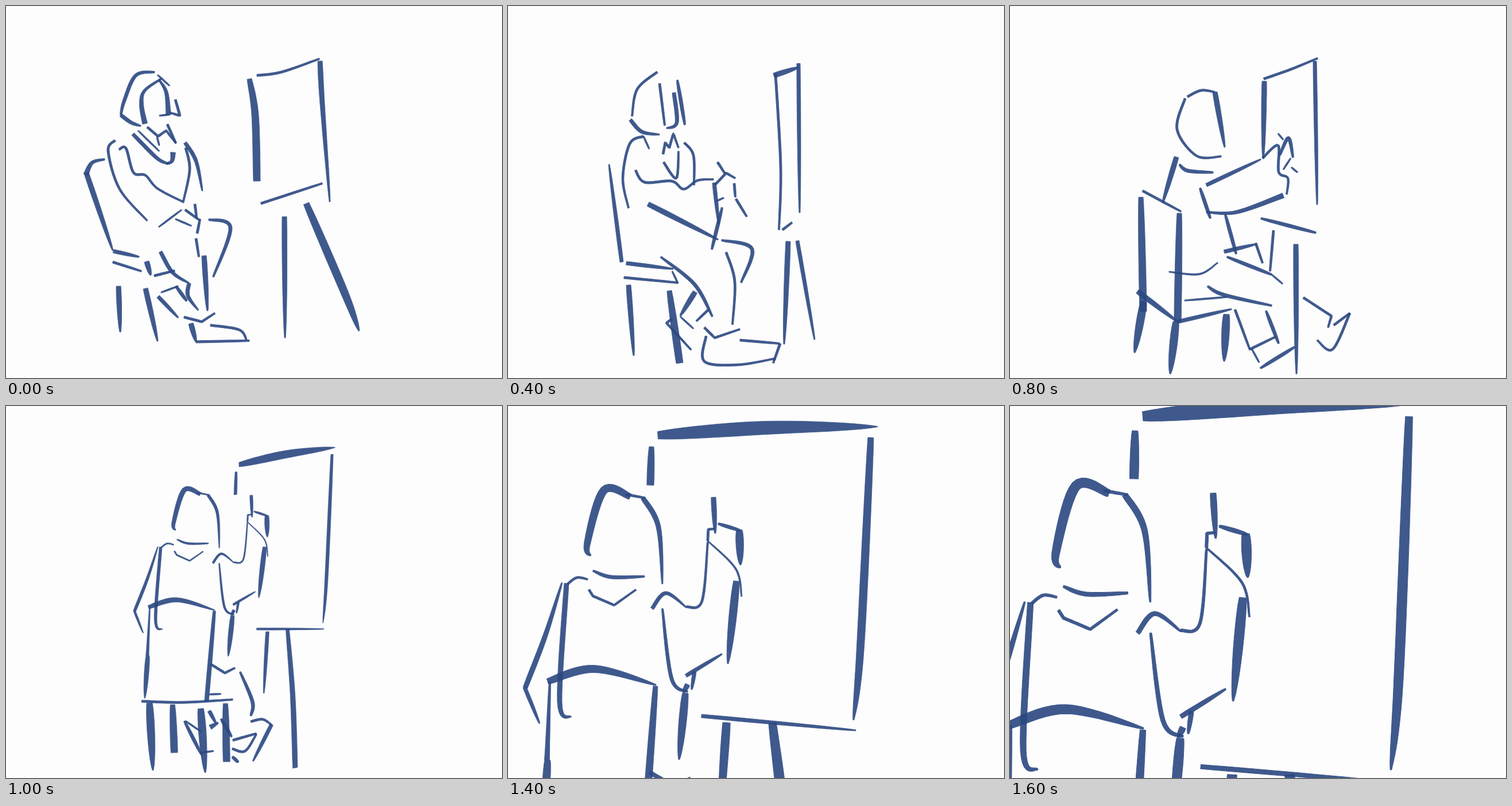
An HTML page for the animation above (2200 ms loop, 864x648 px).

```html
<!DOCTYPE html>
<html lang="en">
<head>
<meta charset="utf-8">
<title>Sketching at the easel</title>
<style>
html, body { margin: 0; width: 100%; height: 100%; overflow: hidden; background: #fdfdfd; }
svg { display: block; width: 100vw; height: 100vh; }
path { fill: #2b4881; stroke: #2b4881; stroke-width: .8; stroke-linejoin: round; opacity: .9; }
</style>
</head>
<body>
<svg id="stage" viewBox="0 0 864 648"></svg>
<script>
const NS = 'http://www.w3.org/2000/svg';
const LOOP = 2200, STEP = 200;
const stage = document.getElementById('stage');
let ink = stage;

function add(parent, tag, attributes) {
  const node = parent.appendChild(document.createElementNS(NS, tag));
  for (const name in attributes) node.setAttribute(name, attributes[name]);
  return node;
}

const widthAt = ([a, b, c], u) =>
  Math.max(.5, a * (1 - u) * (1 - 2 * u) + 4 * b * u * (1 - u) + c * u * (2 * u - 1));

const curve = (a, b, c, d, t) =>
  b + t / 2 * (c - a + t * (2 * a - 5 * b + 4 * c - d + t * (3 * (b - c) + d - a)));
const straight = (a, b, c, d, t) => b + (c - b) * t;

function spine(flat, blend) {
  const last = flat.length / 2 - 1, steps = 10, out = [];
  const at = (i, n) => flat[2 * Math.min(last, Math.max(0, i)) + n];
  for (let k = 0; k <= last * steps; k++) {
    const i = Math.min(last - 1, Math.floor(k / steps)), t = k / steps - i;
    out.push([0, 1].map(n => blend(at(i - 1, n), at(i, n), at(i + 1, n), at(i + 2, n), t)));
  }
  return out;
}

// Outline of a ribbon whose width runs from start over middle to end.
function ribbon(widths, flat, blend) {
  const mid = spine(flat, blend), end = mid.length - 1, left = [], right = [];
  mid.forEach(([x, y], i) => {
    const [ax, ay] = mid[Math.max(0, i - 1)], [bx, by] = mid[Math.min(end, i + 1)];
    const half = widthAt(widths, i / end) / 2 / (Math.hypot(bx - ax, by - ay) || 1);
    const dx = (ay - by) * half, dy = (bx - ax) * half;
    left.push([x + dx, y + dy]);
    right.unshift([x - dx, y - dy]);
  });
  return 'M' + [...left, ...right].map(p => p.map(v => v.toFixed(1)).join(' ')).join('L') + 'Z';
}

const nib = (widths, blend = curve) => (...flat) =>
  add(ink, 'path', { d: ribbon(widths, flat, blend) });

const fine = nib([2, 3, 2]);
const line = nib([4, 4, 3]);
const zig = nib([4, 4, 3], straight);
const swell = nib([3, 6, 3]);
const taper = nib([6, 6, 2]);
const grow = nib([3, 6, 9]);
const brush = nib([8, 8, 2]);
const broad = nib([10, 13, 2]);
const slab = nib([8, 12, 12]);
const beam = nib([13, 23, 1]);

function frontSitter() {
  swell(259,115, 226,121, 206,165, 200,190);
  taper(200,190, 218,203, 235,209);
  fine(264,120, 285,139);
  grow(270,127, 241,148, 236,172, 242,205);
  grow(266,128, 279,150, 283,189);
  fine(267,191, 286,189);
  zig(295,163, 303,191, 286,186);
  zig(246,211, 265,227, 279,217, 296,239);
  fine(263,228, 267,243);
  line(281,206, 296,239);
  taper(221,223, 263,265, 284,275);
  fine(230,217, 267,253);
  grow(279,275, 289,270, 291,255);
  line(190,234, 178,253, 198,319, 246,374);
  line(197,250, 209,248, 222,290, 243,295, 264,318, 310,342);
  line(313,247, 320,285, 309,340);
  taper(312,238, 331,270, 342,322);
  fine(266,385, 306,355);
  line(312,355, 337,373);
  line(329,345, 332,369);
  line(333,396, 338,371);
  fine(295,371, 323,383);
  swell(353,372, 391,386, 361,472);
  line(331,405, 336,437);
  brush(345,435, 351,531);
  taper(269,428, 290,464, 319,483);
  taper(319,483, 317,505, 335,530);
  fine(270,499, 300,488);
  swell(296,488, 315,514);
  taper(265,506, 300,543);
  zig(310,542, 341,550, 364,535);
  brush(322,553, 331,585);
  line(331,585, 424,583);
  line(356,556, 406,564, 419,582);
}

function frontChair() {
  grow(172,267, 150,273, 139,294);
  brush(140,291, 186,426);
  taper(187,427, 232,437);
  line(186,446, 236,462);
  brush(245,445, 252,469);
  line(258,470, 294,461);
  brush(196,488, 199,568);
  brush(243,492, 264,584);
}

function frontEasel() {
  line(437,121, 480,115, 546,92);
  brush(547,96, 551,170, 564,341);
  slab(424,127, 434,190, 437,305);
  line(444,344, 551,309);
  brush(485,367, 486,578);
  broad(523,344, 590,500, 615,566);
}

function sideSitter() {
  line(260,115, 225,145, 216,192);
  taper(213,198, 233,219, 264,224);
  line(264,135, 273,208);
  taper(289,151, 294,203, 276,213);
  swell(295,129, 308,207);
  zig(270,258, 274,238, 281,247, 288,222, 297,247);
  fine(236,227, 246,249);
  line(236,227, 212,240, 200,300, 210,352);
  line(307,238, 323,260, 324,312);
  line(271,272, 293,300, 297,253);
  line(222,286, 238,307, 285,305, 306,319, 330,304, 358,302);
  brush(244,345, 366,407);
  taper(359,308, 367,380);
  swell(373,351, 355,424);
  line(365,272, 378,292);
  zig(361,311, 380,291, 396,300);
  line(394,309, 396,333);
  fine(363,340, 376,334);
  line(397,336, 416,367);
  swell(372,408, 425,423, 406,482);
  line(380,429, 395,480, 391,555);
  swell(266,437, 325,485, 356,541);
  brush(326,498, 300,540);
  fine(300,541, 323,562);
  line(349,529, 328,549);
  zig(286,545, 276,552, 319,599);
  zig(342,560, 360,578, 404,563);
  line(345,575, 342,619, 400,625, 466,614);
  line(404,582, 473,588);
  line(474,588, 462,622);
}

function sideChair() {
  taper(198,446, 176,276);
  taper(206,448, 288,458);
  line(202,473, 296,482);
  fine(286,462, 296,483);
  brush(210,486, 219,609);
  slab(281,496, 299,622);
}

function sideEasel() {
  line(466,119, 475,280, 472,390);
  brush(463,121, 506,107);
  taper(506,100, 508,360);
  line(478,390, 495,377);
  brush(488,410, 481,589);
  taper(504,409, 534,581);
}

function awaySitter() {
  line(305,161, 291,215, 325,261, 368,262);
  line(309,158, 333,147, 357,150);
  brush(357,150, 374,246);
  swell(295,276, 310,287, 354,290);
  brush(290,263, 266,343);
  swell(331,317, 349,370);
  taper(342,312, 437,267);
  grow(342,359, 395,359, 476,330);
  line(440,265, 467,243, 468,289, 484,300, 482,328);
  fine(467,222, 476,233);
  swell(470,260, 485,230, 493,264);
  fine(489,265, 476,285);
  fine(490,281, 501,290);
  swell(375,363, 394,432);
  taper(373,428, 428,415);
  line(428,413, 440,448);
  swell(378,437, 456,468);
  fine(456,468, 475,484);
  swell(344,488, 372,503, 456,522);
  fine(277,463, 330,467, 362,447);
  fine(304,513, 378,507);
  line(392,529, 418,599);
  swell(446,531, 468,588);
  line(418,598, 463,576);
  fine(421,597, 434,621);
  swell(436,631, 496,594);
  zig(511,508, 560,540, 554,560);
  zig(564,556, 592,535);
  line(592,535, 562,598, 535,582);
}

function awayChair() {
  line(231,322, 298,358);
  slab(228,333, 232,532);
  slab(295,361, 292,550);
  brush(222,497, 292,550);
  taper(292,550, 386,528);
  broad(233,515, 217,604);
  broad(289,550, 279,641);
  broad(377,537, 373,619);
}

function awayEasel() {
  line(442,127, 490,110, 536,91);
  brush(443,131, 441,266);
  taper(531,96, 535,346);
  swell(437,370, 533,395);
  line(459,391, 453,462);
  brush(498,415, 499,641);
}

function closeSitter() {
  broad(213,158, 167,147, 138,240, 144,261);
  line(205,154, 238,160);
  brush(235,160, 262,210, 269,310);
  swell(148,287, 180,298, 238,297);
  zig(141,320, 148,331, 185,347, 223,320);
  line(104,310, 120,299, 139,302);
  brush(30,491, 65,400, 94,308);
  taper(29,490, 55,553);
  brush(102,309, 90,515, 110,542);
  taper(251,353, 275,326, 311,351);
  line(311,350, 338,340, 348,237);
  swell(269,353, 285,475, 313,498);
  broad(398,305, 383,449);
  taper(310,470, 373,432);
  taper(325,463, 320,494);
  brush(313,485, 306,499);
  broad(309,500, 298,616);
  brush(358,159, 361,222);
  zig(348,235, 349,215, 360,214);
  swell(366,205, 405,217);
  broad(403,216, 405,277);
  fine(348,235, 397,284, 407,332);
}

function closeBoard() {
  beam(261,51, 450,38, 644,36);
  broad(632,55, 614,420, 602,547);
  slab(250,71, 248,138);
  taper(337,540, 606,565);
}

function closeChair() {
  broad(69,480, 150,458, 258,486);
  slab(257,488, 238,744);
  grow(73,480, 68,617);
  broad(69,617, 62,738);
}

function closeStand() {
  brush(442,395, 433,507);
  slab(492,396, 505,520, 511,652);
}

function closeLegs() {
  line(236,514, 310,516, 398,511);
  broad(250,517, 256,636);
  slab(291,520, 294,605);
  broad(341,527, 349,640);
  slab(385,518, 387,621);
  zig(358,448, 384,464, 402,455);
  swell(411,462, 433,515, 430,540);
  line(430,550, 451,546, 467,556);
  taper(467,555, 434,620);
  line(398,583, 440,571);
  line(397,598, 420,602, 440,572);
  swell(312,549, 342,608);
  fine(314,549, 342,568);
  taper(356,531, 368,553);
  grow(372,552, 358,560);
  swell(377,545, 396,577);
  fine(340,605, 364,602);
  swell(397,612, 408,622);
  fine(356,502, 377,501);
}

const BASE = 'matrix(.6245 .00765 -.00765 .6245 208.5 47.5)';
const NEAR = 'matrix(1.601 -.0196 .0196 1.601 -334.8 -72)';
const ZOOM = 'matrix(1.25 -.012 .012 1.25 -95.5 -42.6)';
const TURN = 'matrix(.9 0 .04 .978 -6 13)';
const NARROW = 'matrix(.75 0 0 .978 120 11)';
const RISE = 'matrix(.98 0 0 .985 5 8)';
const SLANT = 'matrix(.7 -.1 0 .95 146 62)';

// Close-up parts and lower parts are sketched at different scales.
const closeUp = (body, board) => [
  [closeStand, board], [closeBoard, board + BASE],
  [closeLegs, body], [closeSitter, body + BASE], [closeChair, body + BASE]
];

const scenes = [
  [[frontSitter], [frontChair], [frontEasel]],
  [[sideSitter], [sideChair], [sideEasel]],
  [[awaySitter, TURN], [awayChair, TURN], [awayEasel, NARROW]],
  [[awaySitter], [awayChair], [awayEasel]],
  closeUp(RISE, SLANT),
  closeUp('', ''),
  closeUp(NEAR, NEAR),
  closeUp(ZOOM + NEAR, ZOOM + NEAR)
].map(layers => {
  const scene = add(stage, 'g', { display: 'none' });
  for (const [sketch, transform = ''] of layers) {
    ink = add(scene, 'g', { transform });
    sketch();
  }
  return scene;
});

// The first pose holds for two steps, the last one until the loop ends.
function render(time) {
  const step = Math.floor(time % LOOP / STEP) - 1;
  const current = Math.max(0, Math.min(scenes.length - 1, step));
  scenes.forEach((scene, i) => scene.setAttribute('display', i === current ? 'inline' : 'none'));
}

function tick() {
  render(performance.now());
  requestAnimationFrame(tick);
}
tick();
</script>
</body>
</html>
```
